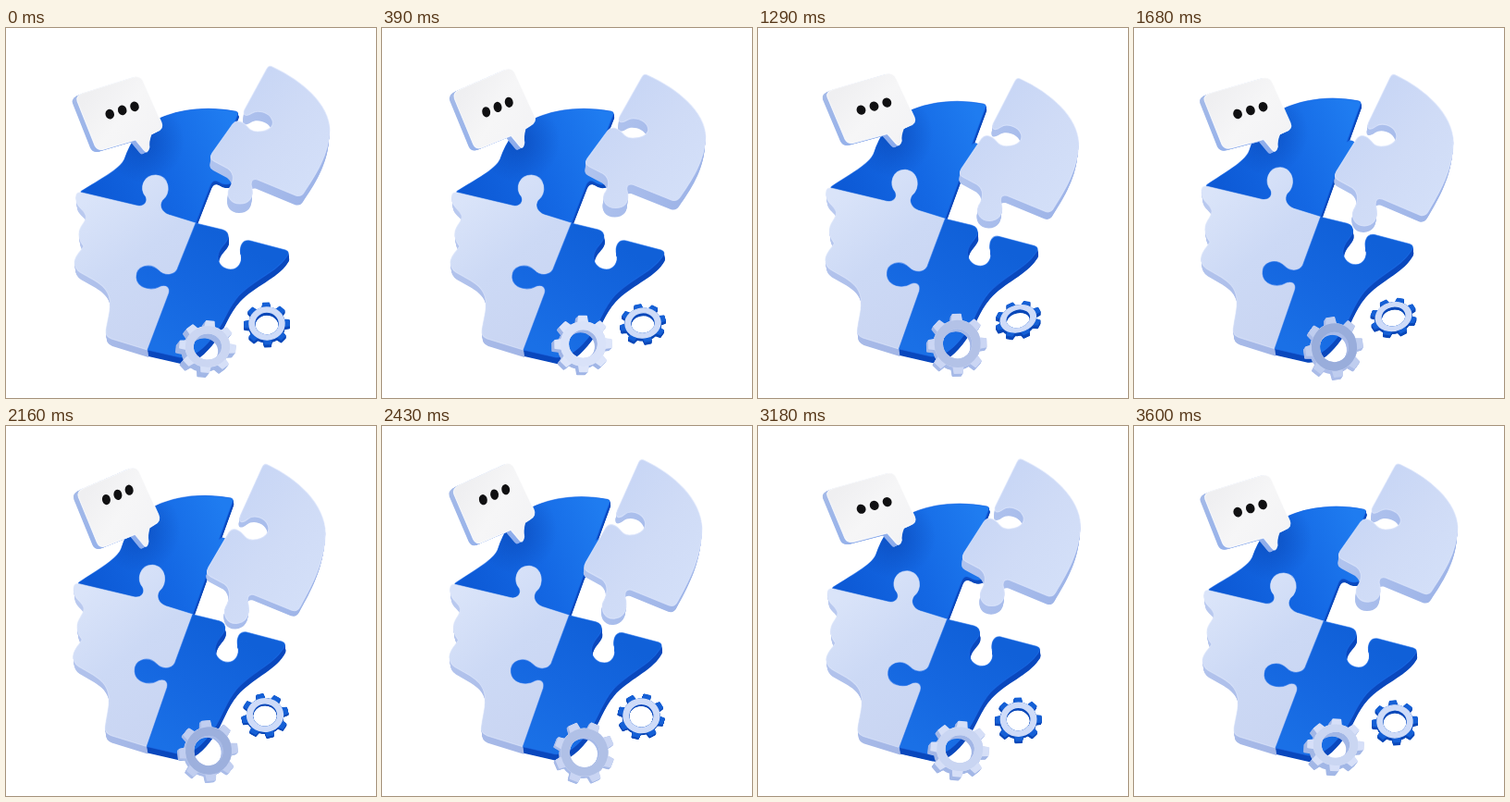
An HTML page with a canvas for the animation above (3630 ms loop, 400 px wide and 400 px high).

```html
<!DOCTYPE html>
<html lang="en">
<head>
<meta charset="utf-8">
<title>Puzzle head</title>
<style>
  html, body { margin: 0; width: 100%; height: 100%; overflow: hidden; background: #fff; }
  canvas { display: block; width: 400px; height: 400px; }
</style>
</head>
<body>
<canvas id="stage" width="400" height="400"></canvas>
<script>
const ctx = document.getElementById('stage').getContext('2d');
const LOOP = 3630, TAU = Math.PI * 2;

// Outlines in their pose at time zero
const crown = new Path2D('M82 176 C101 164 123 153 128 142 C135 122 145 107 163 99 C190 86 222 85 248 90 ' +
  'Q252 91 250 95 L235 133 C239 128 250 136 252 148 C255 166 240 173 231 167 C226 164 223 165 221 170 L205 211 L84 180 Q79 178 82 176Z');
const face = new Path2D('M205 211 L153 348 L114 336 Q107 333 108 327 C110 313 114 303 112 293 ' +
  'C110 283 104 278 96 273 L80 264 Q74 260 74 253 C75 245 82 240 84 236 C79 230 77 222 81 215 C84 210 88 206 86 202 ' +
  'C84 196 77 194 76 187 Q74 176 82 178 L141 192 C149 194 154 188 151 182 C144 174 148 159 162 159 ' +
  'C177 160 179 179 169 186 C165 192 168 199 176 202Z');
const nape = new Path2D('M205 211 L234 218 Q241 220 240 227 C238 234 230 237 229 247 C229 256 236 261 243 261 ' +
  'C251 261 256 253 254 245 C252 237 255 228 264 230 L302 240 Q308 242 303 248 C292 264 268 272 252 289 ' +
  'C240 302 236 318 226 331 C214 347 202 357 188 356 L153 348 L176 287 C178 280 173 277 167 279 ' +
  'C157 285 142 281 141 270 C140 257 156 253 165 262 C172 269 182 267 185 261Z');
const wedge = new Path2D('M288 42 C320 57 349 82 350 110 C349 138 334 160 322 178 Q319 183 313 181 L272 164 ' +
  'C265 162 264 168 266 173 C268 184 262 190 253 190 C243 190 238 182 241 174 C246 167 248 158 240 152 ' +
  'L225 144 Q219 141 223 135 L245 104 Q249 99 255 102 C262 105 262 112 272 112 C284 112 290 106 288 100 ' +
  'C285 91 272 88 266 92 C260 96 255 95 258 88 L282 44 Q284 40 288 42Z');
const bubble = new Path2D('M84 70 L138 53 Q146 51 149 59 L168 102 Q171 109 163 112 L157 115 Q154 123 155 129 ' +
  'Q153 137 149 132 L140 121 L106 131 Q99 133 96 127 L77 79 Q75 73 84 70Z');

// Periodic cubic through the key poses
const times = [0, 390, 900, 1680, 2160, 2730];
function pose(keys, t) {
  const n = times.length;
  const at = k => times[(k + n) % n] + LOOP * Math.floor(k / n);
  const val = (k, j) => keys[(k + n) % n][j];
  let i = n - 1;
  while (times[i] > t) i--;
  const h = at(i + 1) - at(i), s = (t - at(i)) / h;
  const slope = (k, j) => (val(k + 1, j) - val(k - 1, j)) / (at(k + 1) - at(k - 1)) * h;
  return keys[0].map((_, j) => {
    const a = val(i, j), b = val(i + 1, j);
    return a + (b - a) * s * s * (3 - 2 * s) + slope(i, j) * s * (1 - s) ** 2 - slope(i + 1, j) * s * s * (1 - s);
  });
}

// Affine matrix taking three anchor points to three others
function fit([ax, ay, bx, by, cx, cy], to) {
  const ux = bx - ax, uy = by - ay, vx = cx - ax, vy = cy - ay, det = ux * vy - uy * vx;
  const row = i => {
    const p = to[i + 2] - to[i], q = to[i + 4] - to[i];
    const m = (p * vy - q * uy) / det, n = (q * ux - p * vx) / det;
    return [m, n, to[i] - m * ax - n * ay];
  };
  const x = row(0), y = row(1);
  return [x[0], y[0], x[1], y[1], x[2], y[2]];
}

function place([a, b, c, d, e, f], dx = 0, dy = 0) {
  ctx.setTransform(a, b, c, d, e + dx, f + dy);
}

function extrude(path, m, dx, dy, color) {
  ctx.fillStyle = color;
  for (let i = 10; i > 0; i--) {
    place(m, dx * i / 10, dy * i / 10);
    ctx.fill(path);
  }
}

function cap(path, m, fill, edge) {
  place(m);
  ctx.fillStyle = fill;
  ctx.fill(path);
  ctx.strokeStyle = edge;
  ctx.lineWidth = 1;
  ctx.stroke(path);
}

function blend(x0, y0, x1, y1, ...colors) {
  const g = ctx.createLinearGradient(x0, y0, x1, y1);
  colors.forEach((c, i) => g.addColorStop(i / (colors.length - 1), c));
  return g;
}

const crownFill = blend(95, 175, 245, 110, '#0d5ad6', '#1468e4', '#1f7cf0');
const faceFill = blend(80, 190, 180, 320, '#dae4f9', '#ccd9f5', '#c9d5f2');
const napeFill = blend(250, 230, 175, 350, '#1060d8', '#1567e0', '#1a70e6');
const wedgeFill = blend(240, 90, 330, 170, '#c8d6f5', '#cfdbf6', '#d3dff8');
const bubbleFill = blend(90, 70, 160, 125, '#efeff1', '#f6f6f7', '#f3f3f5');
const shade = ctx.createRadialGradient(148, 122, 6, 148, 122, 45);
shade.addColorStop(0, 'rgba(3,50,150,.35)');
shade.addColorStop(1, 'rgba(3,50,150,0)');

function drawHead(t) {
  const swing = lag => (Math.cos((t - lag) / LOOP * TAU) - Math.cos(lag / LOOP * TAU)) / 2;
  const kx = swing(50), ky = swing(200);
  const rest = [204, 211, 250, 91, 152, 347];
  const to = rest.slice();
  for (let i = 0; i < 6; i += 2) {
    const x = rest[i] - 204, y = rest[i + 1] - 211;
    to[i] += kx * (3.5 + 0.01 * x - 0.015 * y);
    to[i + 1] += ky * (7.5 + 0.01 * x - 0.04 * y);
  }
  const m = fit(rest, to);
  extrude(crown, m, 1, 4, '#0a49bd');
  extrude(face, m, 1, 8, blend(75, 200, 150, 350, '#b9c9ef', '#a3b6e6'));
  extrude(nape, m, 1, 7, '#0a48bd');
  cap(crown, m, crownFill, 'rgba(20,100,230,.6)');
  ctx.fillStyle = shade;
  ctx.fill(crown);
  cap(face, m, faceFill, 'rgba(225,233,252,.6)');
  cap(nape, m, napeFill, 'rgba(30,110,235,.6)');
}

// Top, lower right and left corners, then thickness
const wedgeKeys = [
  [285, 41, 318, 181, 222, 138, 10],
  [284, 50, 318, 186, 221, 144, 10],
  [282, 56, 317, 193, 220, 151, 9],
  [280, 50, 314, 202, 218, 158, 7],
  [280, 41, 314, 199, 218, 156, 6],
  [281, 33, 317, 188, 221, 145, 8]
];

function drawWedge(t) {
  const p = pose(wedgeKeys, t);
  const m = fit(wedgeKeys[0], p);
  extrude(wedge, m, -1, p[6], blend(225, 150, 320, 180, '#b0c3ee', '#9fb5e8'));
  cap(wedge, m, wedgeFill, 'rgba(222,231,252,.7)');
}

const hop = [[0.46], [0.49], [0.46], [0.46], [0.3], [0.46]];

function drawBubble(t) {
  const a = t / LOOP * TAU * 2, c = Math.cos(a), s = Math.sin(a);
  const rest = [77, 73, 148, 51, 98, 134];
  const mean = [76.5, 69.5, 146, 45, 98.5, 130];
  const sway = [1.4, -0.3, -3.4, -4.3, 2.6, 2.1];
  const m = fit(rest, mean.map((v, i) => v + (rest[i] - v) * c + sway[i] * s));
  extrude(bubble, m, -5, 2.5, blend(75, 80, 150, 135, '#a3b9e8', '#8cacec'));
  cap(bubble, m, bubbleFill, 'rgba(255,255,255,.8)');
  const v = pose(hop, t)[0];
  ctx.fillStyle = '#101012';
  for (const u of [0.36, 0.55, 0.737]) {
    ctx.beginPath();
    ctx.ellipse(77 + 71 * u + 21 * v, 73 - 22 * u + 61 * v, 4.7, 5.4, -0.3, 0, TAU);
    ctx.fill();
  }
}

function ring(outer, inner) {
  const p = new Path2D();
  p.arc(0, 0, outer, 0, TAU);
  p.closePath();
  p.moveTo(inner, 0);
  p.arc(0, 0, inner, 0, TAU);
  return p;
}

function cog(teeth, root, hole) {
  const p = new Path2D(), step = TAU / teeth;
  for (let i = 0; i < teeth; i++)
    for (const [f, r] of [[-0.27, root], [-0.17, 0.97], [0.17, 0.97], [0.27, root], [0.5, root]])
      p.lineTo(r * Math.cos((i + f) * step), r * Math.sin((i + f) * step));
  p.closePath();
  p.moveTo(hole, 0);
  p.arc(0, 0, hole, 0, TAU);
  return p;
}

function drawCog(path, [x, y, rx, ry, ex, ey, tilt], spin, side, front) {
  const layer = (k, shape, color) => {
    ctx.setTransform(1, 0, 0, 1, x + ex * k, y + ey * k);
    ctx.rotate(tilt);
    ctx.scale(rx, ry);
    ctx.rotate(spin);
    ctx.fillStyle = ctx.strokeStyle = color;
    ctx.lineWidth = 0.06;
    ctx.lineJoin = 'round';
    ctx.fill(shape, 'evenodd');
    ctx.stroke(shape);
  };
  for (let i = 8; i > 0; i--) layer(i / 8, path, side);
  for (const [shape, color] of front) layer(0, shape, color);
}

const mix = (a, b, k) => 'rgb(' + a.map((v, i) => Math.round(v + (b[i] - v) * k)) + ')';
const bigCog = cog(8, 0.76, 0.52), bigRing = ring(0.75, 0.52);
const smallCog = cog(8, 0.76, 0.54), smallRing = ring(0.76, 0.54);

// Centre, radii, depth vector, tilt (and brightness for the big one)
const bigKeys = [
  [218, 344.5, 31, 28.5, -4, 5, 0, 0.8],
  [217.5, 341.5, 31.5, 31, -3, 3, 0, 1],
  [215.5, 339, 32.5, 32.5, -2, 3, 0, 0.85],
  [216.5, 345, 31.5, 33, -2, 3, 0, 0.1],
  [219, 351, 32, 33, -2, 2, 0, 0.15],
  [218.5, 353, 33, 33, -2, 2, 0, 0.7]
];
const smallKeys = [
  [282, 319.5, 25, 23, 0, 3, 0],
  [282, 319, 25, 21, 0, 3, -0.1],
  [282, 317, 25.5, 18.5, 0, 4, -0.28],
  [280.5, 312, 25.5, 20, 0, 3, -0.25],
  [280, 312.5, 25.5, 23.5, 0, 2, 0],
  [281, 314.5, 25.5, 24, -1, 2, 0]
];

function drawCogs(t) {
  const turn = t / LOOP * TAU;
  drawCog(smallCog, pose(smallKeys, t), turn - 0.04, '#0a48b8',
    [[smallCog, '#1560d6'], [smallRing, '#cedbf8']]);
  const p = pose(bigKeys, t), k = p[7];
  drawCog(bigCog, p, turn - 1.48, mix([172, 189, 232], [160, 181, 230], k),
    [[bigCog, mix([188, 202, 238], [221, 229, 250], k)], [bigRing, mix([146, 167, 216], [217, 226, 249], k)]]);
}

function frame(now) {
  const t = now % LOOP;
  ctx.setTransform(1, 0, 0, 1, 0, 0);
  ctx.fillStyle = '#fff';
  ctx.fillRect(0, 0, 400, 400);
  drawHead(t);
  drawWedge(t);
  drawBubble(t);
  drawCogs(t);
}

const start = performance.now();
function tick() {
  frame(performance.now() - start);
  requestAnimationFrame(tick);
}
tick();
</script>
</body>
</html>
```
